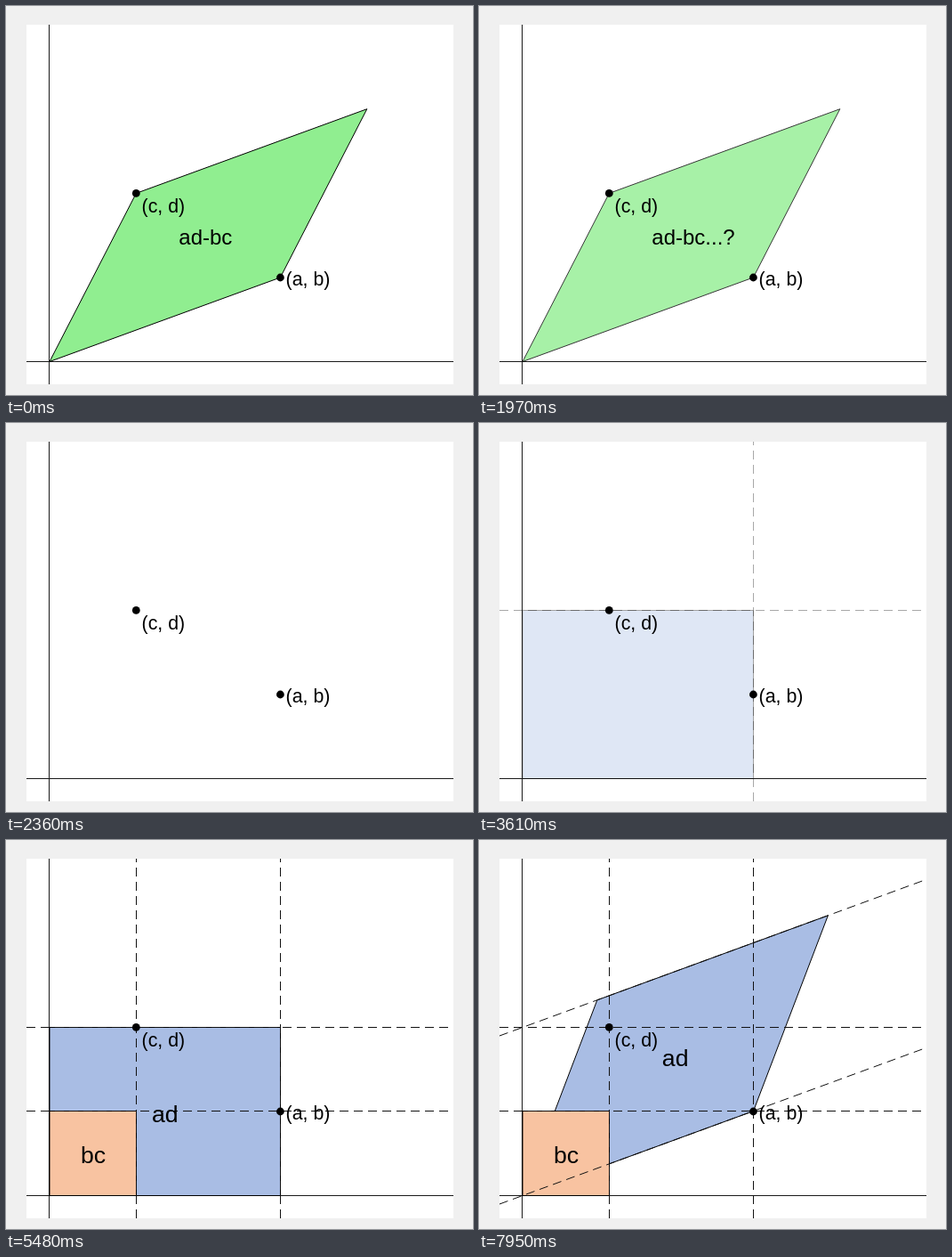
These frames come from a looping animation (525 px wide and 437 px high, 8 s). An HTML page:

```html
<!DOCTYPE html>
<html lang="en">
<head>
<meta charset="utf-8">
<title>Area of a parallelogram</title>
<style>
  html, body { margin: 0; width: 100%; height: 100%; overflow: hidden; background: #f0f0f0; }
  svg { display: block; width: 525px; height: 437px; }
  text { font-family: "Liberation Sans", Arial, sans-serif; font-size: 21.33px; }
  .area { font-size: 24px; }
  .part { font-size: 26.67px; text-anchor: middle; }
  .axis, .dash, .shape { stroke: #000; stroke-width: 1; }
  .axis { stroke: #1a1a1a; }
  .dash { stroke: #111; stroke-dasharray: 10 6; }
  .shape { stroke-linejoin: round; }
</style>
</head>
<body>
<svg viewBox="0 0 525 437">
  <rect x="23" y="21" width="480" height="404" fill="#fff"/>
  <path class="axis" d="M48.5 21V425M23 399.5H503"/>
  <polygon id="whole" class="shape" fill="#90ee90"/>
  <polygon id="blue" class="shape" fill="#a9bde4"/>
  <polygon id="orange" class="shape" fill="#f8c3a1"/>
  <g id="outerGuides"></g>
  <g id="innerGuides"></g>
  <g id="slantGuides"></g>
  <circle cx="308.4" cy="305" r="4.4"/>
  <circle cx="146.3" cy="210.4" r="4.4"/>
  <text x="152.6" y="232">(c, d)</text>
  <text x="314.6" y="314">(a, b)</text>
  <text id="areaLabel" class="area" x="194.3" y="268"></text>
  <text id="blueLabel" class="part">ad</text>
  <text id="orangeLabel" class="part" x="98" y="363">bc</text>
</svg>
<script>
const LOOP = 8000;
const O = [49, 399.5], A = [308.5, 304.5], C = [146.5, 210.5];
const a = A[0] - O[0], b = O[1] - A[1], c = C[0] - O[0], d = O[1] - C[1];
const SLOPE = b / a;
const el = id => document.getElementById(id);
const point = (x, y) => [O[0] + x, O[1] - y];
const setPoints = (id, list) => el(id).setAttribute("points", list.join(" "));

function guide(group, x1, y1, x2, y2) {
  const line = document.createElementNS("http://www.w3.org/2000/svg", "line");
  Object.entries({ x1, y1, x2, y2, class: "dash" }).forEach(([k, v]) => line.setAttribute(k, v));
  el(group).append(line);
}
const across = (group, y) => guide(group, 23, y, 503, y);
const upright = (group, x) => guide(group, x, 425, x, 21);
const slanted = y => guide("slantGuides", 23, y + (O[0] - 23) * SLOPE, 503, y - (503 - O[0]) * SLOPE);

across("outerGuides", C[1]);
upright("outerGuides", A[0]);
across("innerGuides", A[1]);
upright("innerGuides", C[0]);
slanted(O[1]);
slanted(C[1]);

setPoints("whole", [O, [308.4, 305], [405.8, 115.7], [146.3, 210.4]]);
setPoints("orange", [O, point(c, 0), point(c, b), point(0, b)]);

// Each track holds [start time, value] steps.
const tracks = {
  areaText: [[0, "ad-bc"], [880, "ad-bc...?"], [2360, ""]],
  whole: [[0, 1], [1970, .79], [2050, .59], [2130, .39], [2200, .19], [2280, 0]],
  blue: [[0, 0], [3520, .12], [3610, .36], [3680, .68], [3760, 1]],
  blueText: [[0, 0], [3760, 1]],
  orange: [[0, 0], [5100, .2], [5180, .4], [5250, .6], [5330, .8], [5400, 1]],
  orangeText: [[0, 0], [5480, 1]],
  lift: [[0, 0], [6410, .12], [6490, .36], [6570, .61], [6640, .86], [6720, 1]],
  slide: [[0, 0], [7800, .3], [7870, .58], [7950, .86]]
};
const at = (name, t) => tracks[name].findLast(step => step[0] <= t)[1];
const fade = (id, value) => el(id).setAttribute("opacity", value);

function draw(t) {
  const lift = at("lift", t), slide = at("slide", t);
  const rise = b * lift, dx = c * slide, dy = dx * SLOPE;
  setPoints("blue", [O, point(a, rise), point(a + dx, d + rise + dy), point(dx, d + dy)]);

  const [x, y] = point((a + dx) / 2, (d + rise + dy) / 2);
  el("blueLabel").setAttribute("x", x);
  el("blueLabel").setAttribute("y", y + 11.5);
  el("areaLabel").textContent = at("areaText", t);

  fade("whole", at("whole", t));
  fade("blue", at("blue", t));
  fade("outerGuides", at("blue", t));
  fade("blueLabel", at("blueText", t));
  fade("orange", at("orange", t));
  fade("innerGuides", at("orange", t));
  fade("orangeLabel", at("orangeText", t));
  fade("slantGuides", lift);
}

const start = performance.now();
function tick() {
  draw((performance.now() - start) % LOOP);
  requestAnimationFrame(tick);
}
tick();
</script>
</body>
</html>
```
